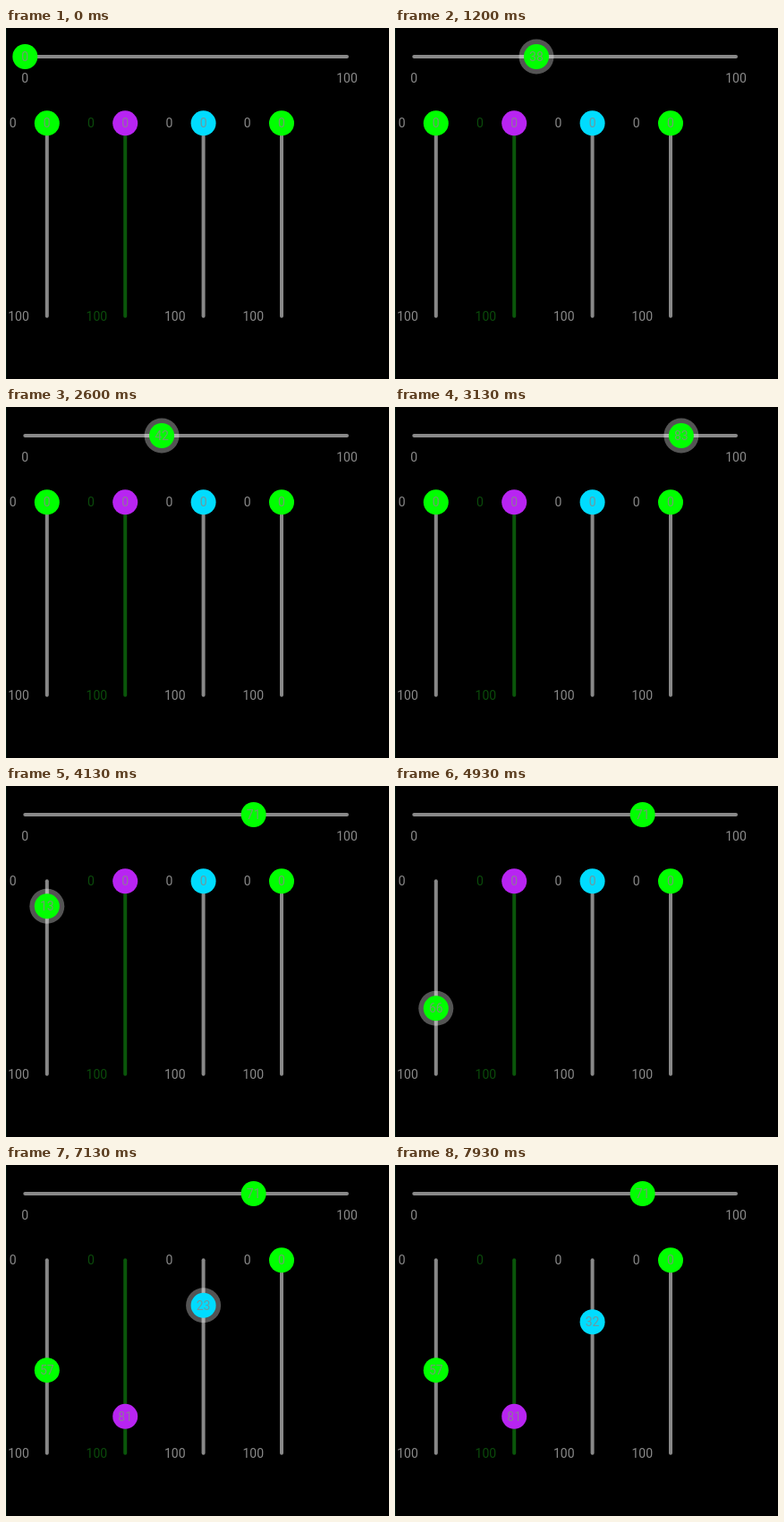
An HTML page that plays this animation: 428x392 px, repeating every 8 s.

```html
<!DOCTYPE html>
<html lang="en">
<head>
<meta charset="utf-8">
<title>Sliders</title>
<style>
  html, body { margin: 0; width: 100%; height: 100%; overflow: hidden; background: #000; }
  svg { display: block; }
  text { font: 14px Roboto, sans-serif; fill: #888; text-anchor: middle; }
  line { stroke-width: 4; stroke-linecap: round; }
</style>
</head>
<body>
<svg id="stage" width="428" height="392" viewBox="0 0 428 392">
  <rect width="1" height="392" fill="#00140d"/>
</svg>
<script>
const LOOP = 8000;
const GRAY = '#888', GREEN = '#0f0';
const stage = document.getElementById('stage');

function add(parent, tag, attrs, content = '') {
  const node = document.createElementNS('http://www.w3.org/2000/svg', tag);
  for (const key in attrs) node.setAttribute(key, attrs[key]);
  node.textContent = content;
  return parent.appendChild(node);
}

const column = (index, thumb, drag, track = GRAY, label = GRAY) =>
  ({ cross: 45.8 + 87.4 * index, from: 106.3, to: 321.8, thumb, drag, track, label });

// Drag keys are [time, value]: grab, turning points, release.
const sliders = [
  { horizontal: true, cross: 32, from: 21.3, to: 381, thumb: GREEN, track: GRAY, label: GRAY,
    drag: [[330, 2], [1200, 38], [1930, 80], [2520, 38], [2930, 87], [3530, 71]] },
  column(0, GREEN, [[4130, 13], [4650, 71], [5330, 57]]),
  column(1, '#b824f2', [[5530, 20], [5730, 97], [5930, 97], [6130, 81], [6530, 81]],
    '#0a560a', '#0a4a0a'),
  column(2, '#00dcff', [[7000, 6], [7400, 79], [7800, 32]]),
  column(3, GREEN, [])
];

const along = (s, value) => s.from + (s.to - s.from) * value / 100;
const point = (s, value) => s.horizontal ? [along(s, value), s.cross] : [s.cross, along(s, value)];

function build(s) {
  const [x1, y1] = point(s, 0), [x2, y2] = point(s, 100);
  add(stage, 'line', { x1, y1, x2, y2, stroke: s.track });

  for (const value of [0, 100]) {
    const [x, y] = point(s, value), text = String(value);
    const place = s.horizontal
      ? { x, y: y + 29 }
      : { x: x - 41.4 + 3.2 * text.length, y: y + 5 };
    add(stage, 'text', { ...place, style: `fill:${s.label}` }, text);
  }

  s.knob = add(stage, 'g', {});
  s.halo = add(s.knob, 'circle', { r: 19.5, fill: '#fff', 'fill-opacity': .33 });
  add(s.knob, 'circle', { r: 14, fill: s.thumb });
  s.readout = add(s.knob, 'text', { y: 5, 'fill-opacity': .8 });
}

function valueAt(drag, t) {
  const next = drag.findIndex(key => key[0] > t);
  if (next === 0 || !drag.length) return 0;
  if (next < 0) return drag[drag.length - 1][1];
  const [t0, v0] = drag[next - 1], [t1, v1] = drag[next];
  return v0 + (v1 - v0) * (1 - Math.cos(Math.PI * (t - t0) / (t1 - t0))) / 2;
}

function update(s, t) {
  const value = valueAt(s.drag, t);
  const held = s.drag.some(key => key[0] <= t) && s.drag.some(key => key[0] > t);
  s.knob.setAttribute('transform', `translate(${point(s, value)})`);
  s.halo.setAttribute('visibility', held ? 'visible' : 'hidden');
  s.readout.textContent = Math.round(value);
}

function frame() {
  // The picture refreshes twice in every 200 ms, at 0 and 130.
  const now = performance.now() % LOOP;
  const phase = now % 200;
  const t = now - phase + (phase >= 130 ? 130 : 0);
  sliders.forEach(s => update(s, t));
  requestAnimationFrame(frame);
}

sliders.forEach(build);
frame();
</script>
</body>
</html>
```
